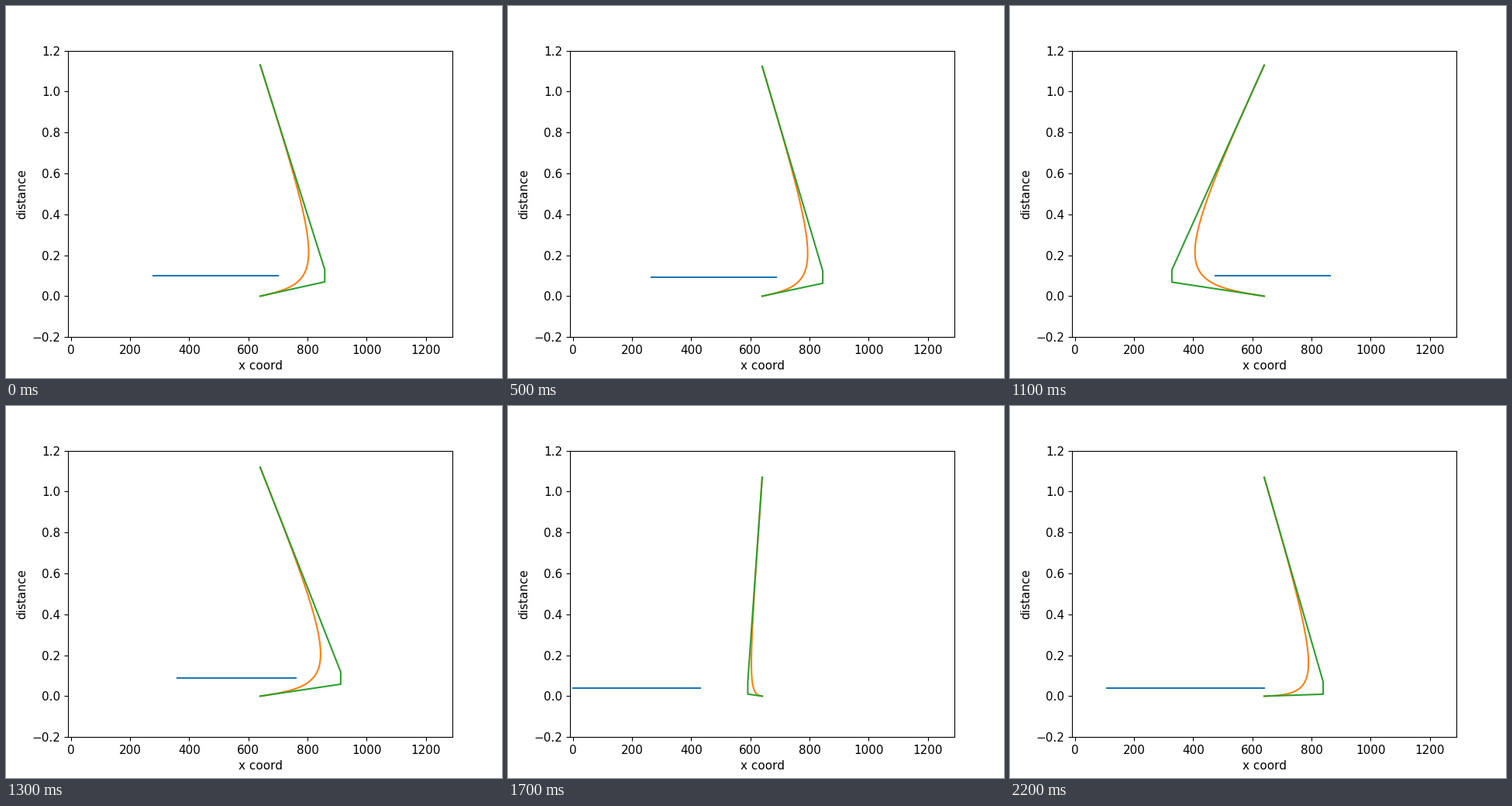
These frames come from a looping animation (640x480 px, 2300 ms). A matplotlib script:

```python
import numpy as np
import matplotlib.pyplot as plt
from matplotlib.animation import FuncAnimation

plt.rcParams.update({"font.family": "DejaVu Sans", "font.size": 11})

FRAMES = 23
CENTER = 640      # x where the path starts and ends
MARGIN = 0.375    # clearance, as a share of the obstacle width
GAP = 0.03        # half depth of the obstacle

# Turning points of the obstacle, which moves evenly between them
STEPS = (0, 5, 8, 11, 13, 17, 22)
LEFT = (278, 266, 483.5, 474, 359.5, 0, 108)
RIGHT = (700, 687, 876, 864, 761.5, 430, 640)
DIST = (0.1, 0.093, 0.104, 0.0985, 0.0885, 0.04, 0.0395)


def control_points(left, right, dist):
    """Pass the obstacle on the side nearer to the center."""
    pad = MARGIN * (right - left)
    side = right + pad if (left + right) / 2 < CENTER else left - pad
    return np.array([(CENTER, 0), (side, dist - GAP),
                     (side, dist + GAP), (CENTER, dist + 1 + GAP)])


def bezier(points, n=100):
    t = np.linspace(0, 1, n)[:, None]
    a, b, c, d = points
    s = 1 - t
    return s**3 * a + 3 * s**2 * t * b + 3 * s * t**2 * c + t**3 * d


fig, ax = plt.subplots(figsize=(6.4, 4.8), dpi=100)
ax.set(xlim=(-10, 1290), ylim=(-0.2, 1.2), xlabel="x coord", ylabel="distance")
bar, curve, hull = (ax.plot([], [], color)[0] for color in ("C0", "C1", "C2"))


def update(step):
    left, right, dist = (np.interp(step, STEPS, v) for v in (LEFT, RIGHT, DIST))
    points = control_points(left, right, dist)
    bar.set_data([left, right], [dist, dist])
    curve.set_data(*bezier(points).T)
    hull.set_data(*points.T)
    return bar, curve, hull


anim = FuncAnimation(fig, update, frames=FRAMES, interval=100,
                     repeat=True, repeat_delay=0)
plt.show()
```
